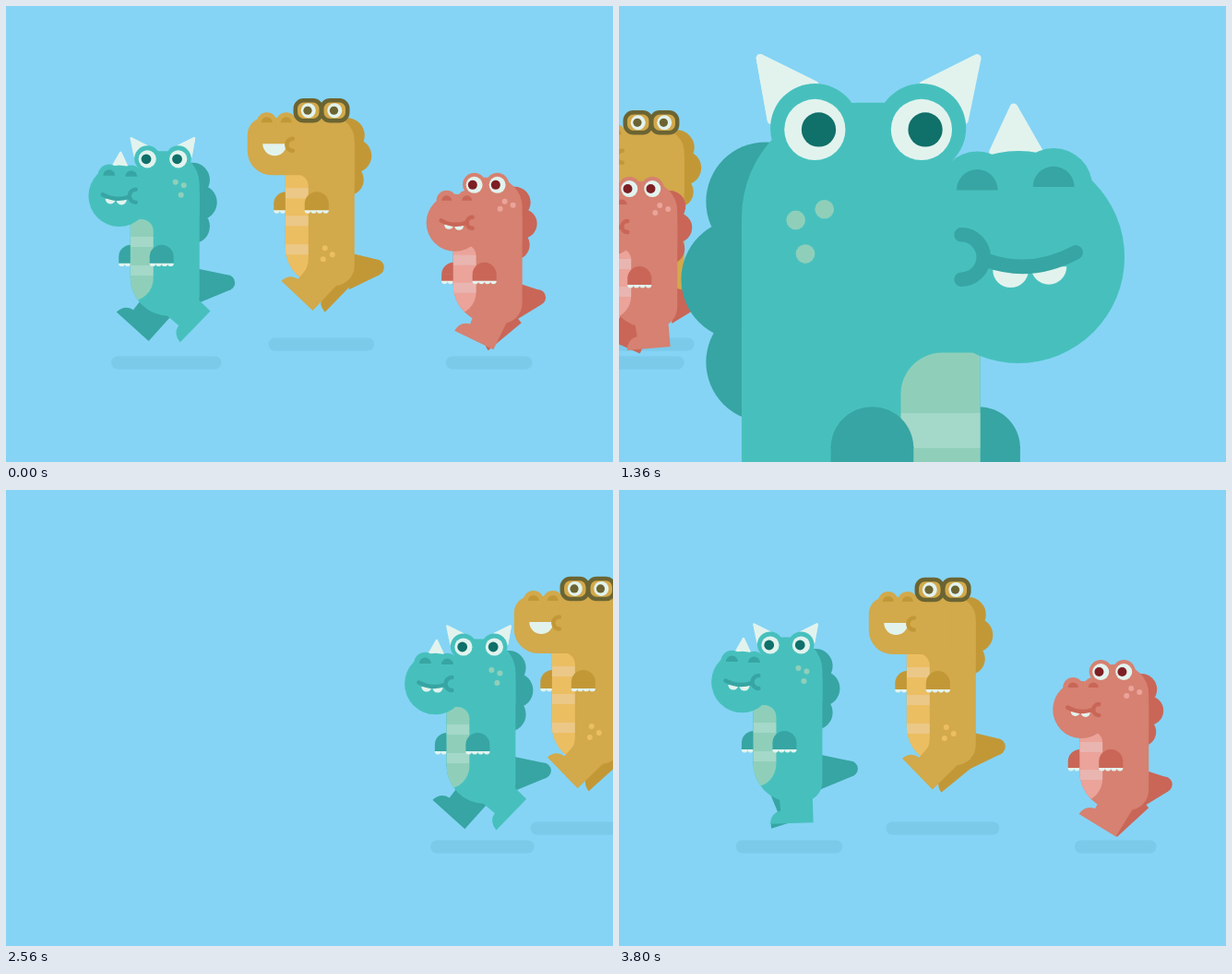
An HTML page with a canvas for the animation above (3840 ms loop, 658x494 px).

```html
<!DOCTYPE html>
<html>
<head>
<meta charset="utf-8">
<style>
html, body { margin: 0; width: 658px; height: 494px; overflow: hidden; background: #85d4f5; }
canvas { display: block; }
</style>
</head>
<body>
<canvas id="stage" width="658" height="494"></canvas>
<script>
const ctx = document.getElementById('stage').getContext('2d');
const LOOP = 3840, TAU = Math.PI * 2;
const WHITE = '#e2f3ee', SKY = '#85d4f5', SHADE = '#7bcaea';

// Dinosaur coordinates: origin at the back edge, level with the eyes, facing left.
const teal = {
  light: '#47c0bd', dark: '#37a5a3', belly: '#8fcfba', stripe: '#a4d8c8', pupil: '#10706a',
  x: 210, y: 167, speed: 0.2677, amp: 8.5, shadowY: 386.5, shadowW: 117, flex: 1,
  headLeft: -66, headTop: -8.5, headRound: 36, bottom: 170,
  spine: [[-7.5, 22.6, 18.7], [0, 47, 19], [-7.5, 73, 18.7]],
  tail: [30, 134, 8.5], eyes: [-56.5, -23], ring: 14, eyeR: 9.6, pupilR: 5.4, look: -1.2,
  snout: [-87, 40, 33.3], bumps: [[-74, 19], [-98, 18]], bumpR: 12.2, nostril: 6.5,
  curl: [-70, 40, 7], smile: [-77, -105], teeth: [[-84.5, 44], [-96.5, 43]], toothR: 5.6,
  spots: [[-17, 28.4], [-26, 25], [-20, 39]], bellyTop: 65, bellyEnd: 154, stripes: [84, 115], armTop: 93,
  horns: true,
  stride: [0, 0.5, 440, 2, 1920, 6.5, 2560, 8.5, 3280, 10.5, 3800, 12.25, LOOP, 12.5],
  bounce: [0, 0.77, 440, 2.05, 1920, 6.67, 2560, 8.69, 3280, 10.55, 3800, 12.73, LOOP, 12.77]
};
const yellow = {
  light: '#d2a94b', dark: '#c29837', belly: '#ecbe62', stripe: '#ebc888', pupil: '#6b6432',
  x: 378, y: 118.5, speed: 0.2258, amp: 12, shadowY: 366.5, shadowW: 106, flex: 0,
  headLeft: -74, headTop: 7, headRound: 25, bottom: 190,
  spine: [[-8, 27, 19], [0, 49, 18.5], [-7, 75, 17]],
  tail: [23, 170, 9], eyes: [-50, -21.5], eyeR: 8, pupilR: 4.6, look: -0.8,
  bumps: [[-95, 13], [-74, 13]], bumpR: 11, nostril: 6,
  curl: [-68, 37, 6.5],
  spots: [[-32, 149], [-24, 156], [-34, 161]], bellyTop: 69, bellyEnd: 186, stripes: [84, 114, 145], armTop: 88,
  glasses: true,
  stride: [0, 0.05, 440, 1.22, 2560, 8, 3280, 10.15, 3800, 11.98, LOOP, 12.05],
  bounce: [0, 0.175, 440, 1.32, 1360, 4.36, 2560, 8.04, 3280, 10.45, 3800, 12.08, LOOP, 12.175]
};
const pink = {
  light: '#d68171', dark: '#c96657', belly: '#eba39a', stripe: '#e9b5b0', pupil: '#7d1f24',
  x: 560, y: 191, speed: 0.365, amp: 7.5, shadowY: 386.5, shadowW: 98, flex: 0.9,
  headLeft: -60, headTop: -8, headRound: 32, bottom: 150,
  spine: [[-8, 19, 17], [0, 42, 16], [-8, 65, 16]],
  tail: [17, 122, 8.5], eyes: [-52, -27], ring: 12.5, eyeR: 9, pupilR: 5, look: -1.8,
  snout: [-73, 41, 31], bumps: [[-82, 17], [-60, 17]], bumpR: 11, nostril: 5.5,
  curl: [-55, 41, 6], smile: [-61, -88], teeth: [[-68.5, 44], [-79.5, 43]], toothR: 5,
  spots: [[-19, 18], [-10, 22], [-24, 26]], bellyTop: 64, bellyEnd: 141, stripes: [76, 106], armTop: 84,
  stride: [0, 0.15, 440, 1.95, 1360, 4.73, 3800, 12.13, LOOP, 12.15],
  bounce: [0, 0.685, 440, 2, 1360, 4.55, 3800, 12.6, LOOP, 12.685]
};
const GIANT = { scale: 3.45, from: 780, to: 2200,
  height: [780, 166, 1130, 166, 1360, 134, 1480, 107, 1660, 150, 1860, 150, 1920, 108, 2200, 150] };

function track(keys, t, ease = u => u) {
  let i = 0;
  while (i < keys.length - 4 && t > keys[i + 2]) i += 2;
  const u = Math.max(0, Math.min(1, (t - keys[i]) / (keys[i + 2] - keys[i])));
  return keys[i + 1] + (keys[i + 3] - keys[i + 1]) * ease(u);
}
const smooth = u => u * u * (3 - 2 * u);

function disc(x, y, r, color, from = 0, to = TAU) {
  ctx.fillStyle = color;
  ctx.beginPath();
  ctx.arc(x, y, r, from, to);
  ctx.fill();
}
const dome = (x, y, r, color) => disc(x, y, r, color, Math.PI, TAU);
const bowl = (x, y, r, color) => disc(x, y, r, color, 0, Math.PI);

function box(x, y, w, h, radii, color) {
  ctx.fillStyle = color;
  ctx.beginPath();
  ctx.roundRect(x, y, w, h, radii);
  ctx.fill();
}

function poly(points, color, soften = 0) {
  ctx.beginPath();
  points.forEach(p => ctx.lineTo(...p));
  ctx.closePath();
  ctx.fillStyle = ctx.strokeStyle = color;
  ctx.fill();
  if (soften) {
    ctx.lineWidth = soften;
    ctx.stroke();
  }
}

function leg(x, y, degrees, color) {
  ctx.save();
  ctx.translate(x, y);
  ctx.rotate(degrees * Math.PI / 180);
  ctx.fillStyle = color;
  ctx.beginPath();
  ctx.moveTo(-15, 0);
  ctx.lineTo(-13, 27);
  ctx.quadraticCurveTo(-24, 29, -25, 41);
  ctx.lineTo(22, 41);
  ctx.lineTo(22, 0);
  ctx.fill();
  ctx.restore();
}

function arm(x, top, color, claws) {
  dome(x, top + 13, 13, color);
  box(x - 13, top + 12.5, 26, 8, 0, color);
  for (let i = 0; i < claws; i++) bowl(x - 9.75 + i * 6.5, top + 20, 3.4, WHITE);
}

function face(d) {
  if (d.horns) {
    poly([[-5.8, -22.5], [-9.3, -3], [-23, -14]], WHITE, 2.5);
    poly([[-74, -22.5], [-57, -14], [-70, -3]], WHITE, 2.5);
    poly([[-85.5, -7], [-79, 7], [-86, 17], [-93.5, 7]], WHITE, 2.5);
  }
  if (d.snout) disc(...d.snout, d.light);
  else box(-116, 8, 90, 62, [18, 0, 0, 26], d.light);
  for (const [x, y] of d.bumps) disc(x, y, d.bumpR, d.light);
  for (const [x, y] of d.bumps) dome(x, y, d.nostril, d.dark);

  if (d.teeth) for (const [x, y] of d.teeth) bowl(x, y, d.toothR, WHITE);
  else bowl(-86.5, 36, 13, WHITE);
  ctx.strokeStyle = d.dark;
  ctx.lineWidth = 4.5;
  ctx.beginPath();
  const [cx, cy, cr] = d.curl;
  ctx.arc(cx + 1, cy, cr, -Math.PI / 2, Math.PI / 2, true);
  if (d.smile) {
    const [a, b] = d.smile;
    ctx.moveTo(a, 41);
    ctx.quadraticCurveTo((a + b) / 2, 46, b, 38.5);
  }
  ctx.stroke();

  for (const x of d.eyes) {
    if (d.ring) disc(x, -0.5, d.ring, d.light);
    if (d.glasses) {
      box(x - 14, -11, 28, 22, 9, d.light);
      ctx.strokeStyle = d.pupil;
      ctx.lineWidth = 4.5;
      ctx.stroke();
    }
    disc(x, 0, d.eyeR, WHITE);
    disc(x + d.look, 0, d.pupilR, d.pupil);
  }
}

function dinosaur(d, stride, flex) {
  const swing = offset => 46 * Math.cos(TAU * (stride + offset));
  const armTop = d.armTop - 6 * flex, sag = 5 * flex;
  const [tx, ty, tr] = d.tail;

  poly([[-6, ty - 16], [tx, ty - tr], [tx + 4, ty + tr - 1], [-6, ty + 24]], d.dark);
  disc(tx, ty, tr, d.dark);
  for (const lobe of d.spine) disc(...lobe, d.dark);
  leg(-44, d.bottom - 18, -swing(-0.07), d.dark);
  arm(-74.5, armTop, d.dark, 4);

  if (d.horns) {
    // Horns sit behind the head, so the head is painted right after them.
    poly([[-5.8, -22.5], [-9.3, -3], [-23, -14]], WHITE, 2.5);
  }
  box(d.headLeft, d.headTop, -d.headLeft, 70, [8, d.headRound, 0, 0], d.light);
  box(-75, 35, 75, d.bottom - 35, [0, 0, 22, 42], d.light);
  ctx.save();
  ctx.clip();
  box(-75, d.bellyTop + sag, 25, d.bellyEnd - d.bellyTop, [0, 13, 25, 0], d.belly);
  ctx.clip();
  for (const y of d.stripes) box(-75, y + sag, 25, 11, 0, d.stripe);
  ctx.restore();
  leg(-33, d.bottom - 18, swing(0), d.light);

  face(d);
  arm(-41, armTop, d.dark, 4);
  for (const [x, y] of d.spots) disc(x, y, 3, d.belly);
}

function walker(d, t) {
  const lift = Math.cos(TAU * track(d.bounce, t));
  const bob = -d.amp * lift;
  const stride = track(d.stride, t);
  for (const lap of [0, LOOP]) {
    const x = d.x - d.speed * (t - lap);
    if (x < -60 || x > 800) continue;
    const w = d.shadowW - 1.6 * bob;
    box(x - 36 - w / 2, d.shadowY - 7, w, 14, 6.5, SHADE);
    ctx.save();
    ctx.translate(x, d.y + bob - (d.glasses ? 0 : 0));
    dinosaur(d, stride, d.flex * Math.max(0, lift) ** 2);
    ctx.restore();
  }
}

function giant(t) {
  if (t < GIANT.from || t > GIANT.to) return;
  ctx.save();
  ctx.translate(132 + 0.998 * (t - 1360), track(GIANT.height, t, smooth));
  ctx.scale(-GIANT.scale, GIANT.scale);
  dinosaur(teal, t / 480, 1);
  ctx.restore();
}

function frame(now) {
  const t = now % LOOP;
  ctx.fillStyle = SKY;
  ctx.fillRect(0, 0, 658, 494);
  ctx.lineCap = ctx.lineJoin = 'round';
  walker(yellow, t);
  walker(teal, t);
  walker(pink, t);
  giant(t);
  requestAnimationFrame(frame);
}
requestAnimationFrame(frame);
</script>
</body>
</html>
```
